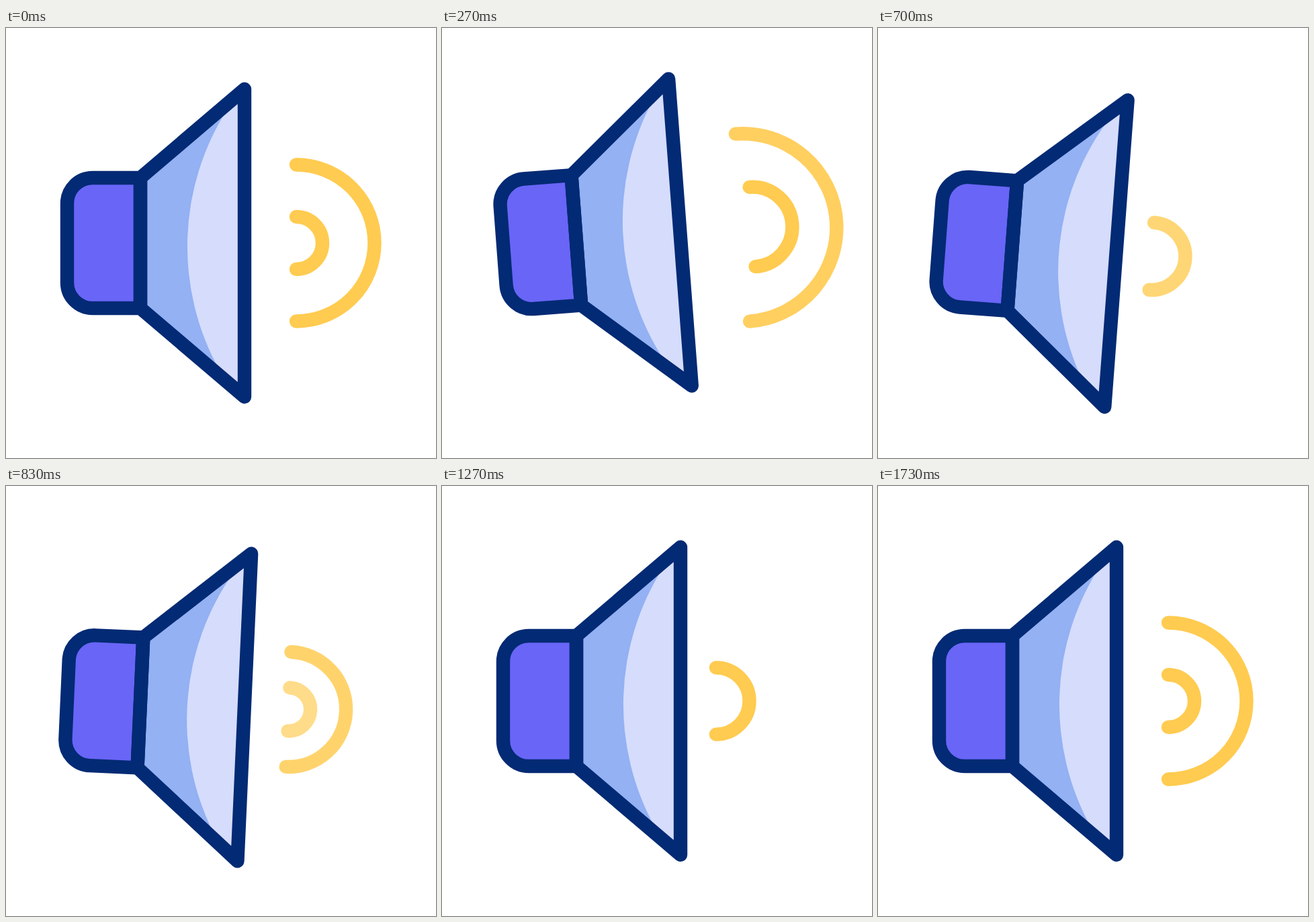
Animation of 640 by 640 pixels, one loop 2000 ms. Source, as an HTML page:

```html
<!DOCTYPE html>
<html lang="en">
<head>
<meta charset="utf-8">
<title>Speaker</title>
<style>
  html, body {
    margin: 0;
    width: 100%;
    height: 100%;
    overflow: hidden;
    background: #fff;
  }

  svg {
    display: block;
    width: 100vw;
    height: 100vh;
  }

  .body {
    stroke: #032a74;
    stroke-width: 20.4;
    stroke-linejoin: round;
  }

  .wave {
    fill: none;
    stroke: #ffcb50;
    stroke-width: 20.4;
    stroke-linecap: round;
  }
</style>
</head>
<body>
<svg viewBox="0 0 640 640">
  <g id="speaker">
    <path fill="#93b1f3" d="M200 223L355 91V549L200 417Z"/>
    <path fill="#d6dcfb" d="M330 120A380 380 0 0 0 318 510L355 549V91Z"/>
    <g class="body">
      <path fill="#6965f7" d="M200 223H129A38 38 0 0 0 91 261V379A38 38 0 0 0 129 417H200Z"/>
      <path fill="none" d="M200 223L355 91V549L200 417Z"/>
    </g>
    <path class="wave" id="outer"/>
    <path class="wave" id="inner"/>
  </g>
</svg>
<script>
  const LOOP = 2000, FPS = 30, FADE = 4.2;
  const speaker = document.getElementById('speaker');

  // Swing of the speaker: [tick, degrees]
  const swing = [[0, 0], [14, -7.1], [14.9, -7.1], [22.2, 5.1], [29.8, -3.3], [37.5, 0]];

  // A wave grows from small through rest to big, each a half circle.
  // Pulses run from stage p to stage q (0 small, 1 rest, 2 big); the last one stays.
  const waves = [
    {
      path: document.getElementById('outer'),
      stages: [{ x: 397.5, r: 21 }, { x: 432, r: 116.5 }, { x: 456, r: 151 }],
      pulses: [
        { start: 0, end: 11.8, p: 1, q: 2 },
        { start: 17.7, end: 28.5, p: 0, q: 1 },
        { start: 33.2, end: 49.2, p: 0, q: 1, stays: true }
      ]
    },
    {
      path: document.getElementById('inner'),
      stages: [{ x: 408, r: 24 }, { x: 432, r: 39 }, { x: 494, r: 79.6 }],
      pulses: [
        { start: 0, end: 16, p: 1, q: 2 },
        { start: 22.2, end: 32.4, p: 0, q: 2 },
        { start: 40, end: 50, p: 0, q: 1, stays: true }
      ]
    }
  ];

  const clamp = v => Math.min(1, Math.max(0, v));
  const mix = (a, b, u) => a + (b - a) * u;
  const easeSine = u => (1 - Math.cos(Math.PI * u)) / 2;

  function angleAt(tick) {
    const i = swing.findIndex(key => key[0] > tick);
    if (i < 0) return 0;
    const [t0, a0] = swing[i - 1], [t1, a1] = swing[i];
    return mix(a0, a1, easeSine((tick - t0) / (t1 - t0)));
  }

  function drawWave({ path, stages, pulses }, tick) {
    const pulse = pulses.find(p => tick >= p.start && (p.stays || tick < p.end));
    path.style.opacity = 0;
    if (!pulse) return;

    const { start, end, p, q, stays } = pulse;
    const stage = mix(p, q, clamp((tick - start) / (end - start)));
    const i = stage < 1 ? 0 : 1;
    const x = mix(stages[i].x, stages[i + 1].x, stage - i);
    const r = mix(stages[i].r, stages[i + 1].r, stage - i);
    const fadeIn = p ? 1 : clamp((tick - start) / FADE);
    const fadeOut = stays ? 1 : clamp((end - tick) / FADE);

    path.style.opacity = fadeIn * fadeOut;
    path.setAttribute('d', `M${x} ${320 - r}a${r} ${r} 0 0 1 0 ${2 * r}`);
  }

  function draw(time) {
    const tick = Math.floor(time % LOOP * FPS / 1000 + 0.2);
    speaker.setAttribute('transform', `rotate(${angleAt(tick)} 145.5 320)`);
    waves.forEach(wave => drawWave(wave, tick));
  }

  const began = performance.now();

  function loop() {
    draw(performance.now() - began);
    requestAnimationFrame(loop);
  }

  loop();
</script>
</body>
</html>
```
